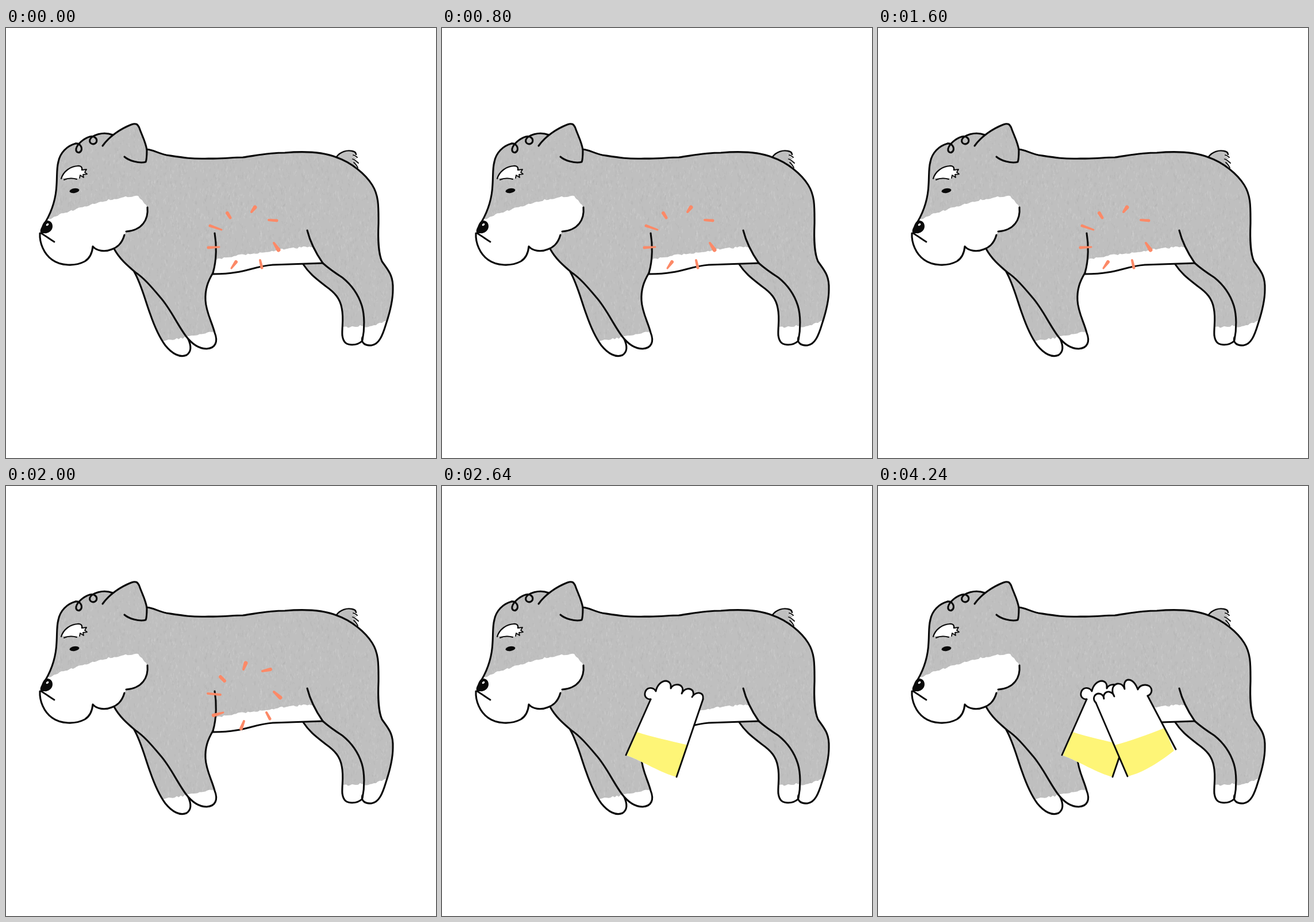
Recreate the animation shown at these times as an HTML page with a canvas. Size 748 by 748 pixels, loop 4.64 s.

```html
<!DOCTYPE html>
<html lang="en">
<head>
<meta charset="utf-8">
<title>Dog massage</title>
<style>
html, body { margin: 0; width: 100%; height: 100%; overflow: hidden; background: #fff; }
canvas { display: block; width: 100vw; height: 100vh; }
</style>
</head>
<body>
<canvas id="stage" width="748" height="748"></canvas>
<script>
const SIZE = 748, LOOP = 4640, BEAT = 400;
const INK = '#0a0a0a', WHITE = '#fff', ORANGE = '#fc8967', YELLOW = '#fef577';
const ctx = document.getElementById('stage').getContext('2d');

let seed = 7;
function rand() {
  seed = (seed * 16807) % 2147483647;
  return seed / 2147483647;
}

function layer(size, draw) {
  const c = document.createElement('canvas');
  c.width = c.height = size;
  draw(c.getContext('2d'));
  return c;
}

// Each segment omits its leading "M" so that segments can be chained.
const shape = (...segs) => new Path2D('M' + segs.join('L') + 'Z');

function ink(g, seg, width = 3.1) {
  g.strokeStyle = INK;
  g.lineWidth = width;
  g.lineCap = g.lineJoin = 'round';
  g.stroke(new Path2D('M' + seg));
}

function paint(g, color, path) {
  g.fillStyle = color;
  g.fill(path);
}

// Ragged brush edge through a few points
function ragged(points, amount = 1.4) {
  const out = [];
  for (let i = 0; i < points.length - 1; i++) {
    const [x, y] = points[i], [u, v] = points[i + 1];
    const n = Math.max(2, Math.round(Math.hypot(u - x, v - y) / 3.5));
    for (let k = 0; k < n; k++) {
      const t = k / n;
      out.push(`${x + (u - x) * t} ${y + (v - y) * t + (rand() - 0.5) * 2 * amount}`);
    }
  }
  out.push(points[points.length - 1].join(' '));
  return out.join('L');
}

const paper = layer(SIZE, g => {
  g.fillStyle = '#bfbfbf';
  g.fillRect(0, 0, SIZE, SIZE);
  g.lineCap = 'round';
  for (let i = 0; i < 16000; i++) {
    const x = rand() * SIZE, y = rand() * SIZE;
    g.strokeStyle = rand() < 0.5 ? 'rgba(212,212,212,.28)' : 'rgba(174,174,174,.22)';
    g.lineWidth = 1 + rand() * 1.5;
    g.beginPath();
    g.moveTo(x, y);
    g.lineTo(x + (rand() - 0.5) * 3, y + 1 + rand() * 5);
    g.stroke();
  }
});

const dog = {
  face: '69 337C80 318 87 298 88 272C89 256 88 244 91 233C94 217 106 205 121 201',
  hair: '121 201C128 200 133 207 131 213C128 219 121 217 122 210C124 202 135 192 146 189' +
    'C154 187 160 193 157 199C153 204 144 202 146 194C149 187 168 179 186 186',
  ear: '168 205C180 188 200 175 218 168C226 165 229 167 232 174C236 186 243 198 245 212' +
    'C245 222 245 229 243 233C232 236 214 231 206 224',
  back: '245 211C257 212 264 218 279 221C305 225 320 228 352 227C378 228 392 225 412 225' +
    'C440 221 458 217 485 217C520 214 552 216 575 225C601 234 625 254 637 273' +
    'C649 292 648 312 648 340C647 365 647 390 654 406C665 422 674 430 673 455' +
    'C673 477 667 497 661 515C655 535 649 550 636 552C624 553 617 547 620 538',
  thigh: '620 543C624 523 624 500 619 483C612 461 600 446 585 434C571 425 560 417 551 409',
  thighTip: '551 409C540 393 529 372 524 352',
  belly: '551 409C520 410 492 411 464 412C438 414 422 422 400 425C384 428 374 428 360 428',
  leg: '360 426C351 441 346 455 347 474C348 494 358 511 363 530C369 545 365 557 349 558' +
    'C336 558 323 549 313 536C298 516 286 488 268 468C252 449 239 434 225 425C211 413 197 401 188 384',
  legTip: '363 357C366 375 367 402 360 426',
  farFront: '223 424C236 447 242 474 251 498C259 521 266 537 277 552C289 567 303 574 314 569C323 563 322 552 317 541',
  farHind: '517 411C528 428 541 437 556 449C573 461 581 471 584 487C588 506 584 520 585 535' +
    'C587 548 593 551 602 551C610 551 616 548 620 544',
  cheek: '246 312C248 333 237 352 209 354',
  jaw: '206 360C201 377 192 382 184 385C172 390 158 388 151 380C150 391 145 401 137 406' +
    'C120 415 95 414 80 403C66 393 58 374 59 357',
  tail: '575 224C582 215 593 212 602 214C607 215 609 217 609 220'
};

function paw(g, limb, points, bottom) {
  g.save();
  g.clip(limb);
  const [a, b] = [points[0][0], points[points.length - 1][0]];
  paint(g, WHITE, shape(ragged(points), `${b} ${bottom}`, `${a} ${bottom}`));
  g.restore();
}

const body = layer(SIZE, g => {
  g.fillStyle = WHITE;
  g.fillRect(0, 0, SIZE, SIZE);
  const gray = g.createPattern(paper, 'repeat');

  const farFront = shape(dog.farFront, '330 500', '260 430');
  paint(g, gray, farFront);
  paw(g, farFront, [[268, 546], [290, 542], [325, 536]], 580);
  ink(g, dog.farFront);

  const farHind = shape(dog.farHind, '650 460', '590 400');
  paint(g, gray, farHind);
  paw(g, farHind, [[578, 521], [602, 520], [630, 516]], 560);
  ink(g, dog.farHind);

  paint(g, gray, shape(dog.tail, '604 223', '611 227', '604 229', '612 235', '606 234', '611 242', '594 234'));
  ink(g, dog.tail, 2.4);
  ink(g, '604 221C607 222 609 223 611 225', 1.8);
  ink(g, '603 228C607 229 610 232 613 235', 1.8);
  ink(g, '605 234C608 236 610 239 612 243', 1.8);

  const torso = shape(dog.face, dog.hair, dog.back, dog.thigh, dog.belly, dog.leg, dog.jaw);
  paint(g, gray, torso);
  paint(g, gray, shape(dog.ear));
  paw(g, torso, [[312, 538], [330, 534], [350, 531], [368, 525]], 565);
  paw(g, torso, [[616, 522], [640, 517], [668, 507]], 560);

  paint(g, WHITE, shape(
    ragged([[365, 403], [400, 396], [445, 391], [480, 385], [510, 382], [535, 380]]),
    '551 409', dog.belly, '365 408'));
  paint(g, WHITE, shape(
    ragged([[73, 333], [100, 322], [140, 309], [175, 300], [208, 293], [230, 293], [239, 302], [246, 312]], 1.6),
    dog.cheek, dog.jaw));

  for (const part of ['face', 'hair', 'ear', 'back', 'thigh', 'thighTip', 'belly', 'leg', 'legTip', 'cheek', 'jaw'])
    ink(g, dog[part]);

  // Eyebrow and eye
  paint(g, WHITE, shape('97 261C101 249 113 241 125 240C131 240 133 243 133 247',
    '140 247', '137 252', '141 254', '134 256', '135 261', '129 257', '127 262C116 260 106 261 97 261'));
  ink(g, '96 262C100 249 112 241 124 240C130 239 133 242 132 247', 2.2);
  ink(g, '132 247L140 246L137 251L141 254L134 255L135 260L129 256L128 261', 1.8);
  ink(g, '101 264C108 261 116 261 123 263', 2);
  g.fillStyle = INK;
  g.beginPath();
  g.ellipse(119, 283, 8.5, 4, -0.16, 0, Math.PI * 2);
  g.fill();

  // Nose and mouth
  paint(g, INK, shape('68 336C74 333 81 337 81 345C81 353 73 358 66 357C59 359 58 353 62 346C64 341 65 338 68 336'));
  g.fillStyle = WHITE;
  g.beginPath();
  g.ellipse(72, 342, 2.6, 1.7, -0.6, 0, Math.PI * 2);
  g.fill();
  ink(g, '61 357C68 361 76 367 84 372', 2.8);
});

// Sore-spot marks: x, y, x, y, width at each end
const marks = [
  [[355, 344, 375, 351, 5, 3], [385, 322, 390, 330, 6, 5], [433, 312, 427, 320, 7, 4], [457, 334, 471, 335, 4, 5],
   [466, 374, 474, 386, 4, 7], [442, 404, 445, 417, 4, 5], [400, 407, 392, 418, 6, 3], [352, 382, 371, 381, 5, 3]],
  [[351, 361, 373, 363, 4, 4], [373, 332, 380, 339, 6, 6], [417, 308, 413, 319, 7, 4], [446, 322, 460, 319, 4, 6],
   [466, 358, 477, 368, 4, 7], [453, 394, 459, 405, 4, 5], [414, 409, 409, 422, 4, 6], [361, 399, 378, 394, 6, 3]]
];

function mark([x, y, u, v, a, b]) {
  const dir = Math.atan2(v - y, u - x), q = Math.PI / 2;
  ctx.fillStyle = ORANGE;
  ctx.beginPath();
  ctx.arc(x, y, a / 2, dir + q, dir - q);
  ctx.arc(u, v, b / 2, dir - q, dir + q);
  ctx.fill();
}

const hands = [
  {
    fingers: '363 371C354 371 351 364 354 357C358 349 368 350 372 357C374 347 381 339 390 339C396 340 399 345 398 352' +
      'C402 344 413 344 417 349C420 353 419 357 417 361C422 351 432 351 436 356C438 360 438 364 435 367' +
      'C440 359 449 358 453 363C455 366 454 369 454 371',
    right: '454 371L408 506', hem: '408 506C382 500 350 479 320 468', left: '320 468L363 371',
    cuff: '339 428C366 437 396 443 425 450'
  },
  {
    fingers: '379 377C373 371 375 363 383 361C389 361 393 365 393 370C391 363 396 357 402 358C407 359 410 362 411 366' +
      'C405 356 408 346 416 344C423 343 427 347 429 353C427 345 429 338 435 337C444 337 449 346 452 354' +
      'C455 346 465 344 472 348C478 353 477 362 469 365',
    right: '469 365L518 458', hem: '518 458C493 478 462 499 434 505', left: '434 505L379 377',
    cuff: '411 451C440 443 468 433 498 421'
  }
];

function hand({ fingers, right, hem, left, cuff }) {
  const arm = shape(fingers, right, hem, left);
  paint(ctx, WHITE, arm);
  ctx.save();
  ctx.clip(arm);
  paint(ctx, YELLOW, shape(cuff, '540 520', '300 520'));
  ctx.restore();
  [fingers, right, left].forEach(seg => ink(ctx, seg, 2.9));
}

function frame(now) {
  const t = now % LOOP;
  ctx.drawImage(body, 0, 0);
  if (t < 6 * BEAT) {
    marks[Math.floor(t / BEAT) % 2].forEach(mark);
  } else {
    hand(hands[0]);
    if (t >= 8 * BEAT) hand(hands[1]);
  }
}

const start = performance.now();
function tick() {
  frame(performance.now() - start);
  requestAnimationFrame(tick);
}
tick();
</script>
</body>
</html>
```
